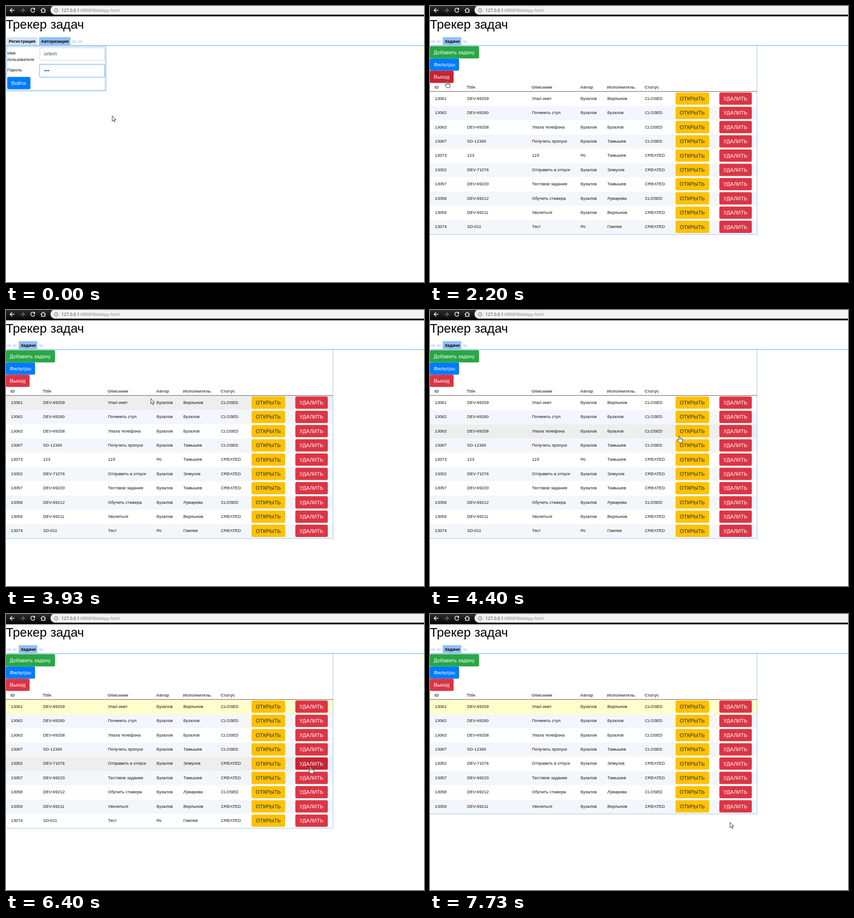
Animation, 921 px wide and 608 px high, one loop 7.79 s. Source, as an HTML page:

```html
<!DOCTYPE html>
<html lang="ru">
<head>
<meta charset="utf-8">
<title>Трекер задач</title>
<style>
html, body { margin: 0; width: 100%; height: 100%; overflow: hidden; background: #fff; }
svg { display: block; font-family: "Liberation Sans", Arial, sans-serif; }
</style>
</head>
<body>
<svg id="stage" width="921" height="608" viewBox="0 0 921 608"></svg>
<script>
const stage = document.getElementById('stage');
const LOOP = 7790, STEP = LOOP / 117;
const LOGIN_PRESS = 1700, SWITCH = 2060, ROWS_READY = 2120;
const DELETIONS = [
  { press: 5255, done: 5520, row: 4 },
  { press: 7380, done: 7600, row: 8 }
];
const ROW_TOP = 189, ROW_H = 31.4;
const LIGHT = '#d0e4f6', ACCENT = '#92c1f0';
const RED = ['#dc3545', '#c82333'], BLUE = ['#007bff', '#0069d9'];
const GREEN = ['#28a745', '#218838'], AMBER = ['#ffc107', '#e0a800'];

const TASKS = [
  ['13061', 'DEV-69259', 'Упал инет', 'Бузалов', 'Верлынов', 'CLOSED'],
  ['13062', 'DEV-69260', 'Починить стул', 'Бузалов', 'Бузалов', 'CLOSED'],
  ['13063', 'DEV-69258', 'Упала телефона', 'Бузалов', 'Бузалов', 'CLOSED'],
  ['13067', 'SD-12345', 'Получить пропуск', 'Бузалов', 'Тамышев', 'CLOSED'],
  ['13073', '123', '123', 'Ро', 'Тамышев', 'CREATED'],
  ['13052', 'DEV-71076', 'Отправить в отпуск', 'Бузалов', 'Элмусев', 'CREATED'],
  ['13057', 'DEV-69220', 'Тестовое задание', 'Бузалов', 'Тамышев', 'CREATED'],
  ['13058', 'DEV-69212', 'Обучить стажера', 'Бузалов', 'Лумарева', 'CLOSED'],
  ['13059', 'DEV-69211', 'Уволиться', 'Бузалов', 'Верлынов', 'CREATED'],
  ['13074', 'SD-011', 'Тест', 'Ро', 'Гамлев', 'CREATED']
];
const HEADERS = ['ID', 'Title', 'Описание', 'Автор', 'Исполнитель', 'Статус'];
const COLUMNS = [10, 81, 224, 331, 390, 473];

// Pointer path: time, x, y
const PATH = [
  [400, 234, 242], [1200, 96, 144], [1265, 96, 144], [1600, 37, 164],
  [1800, 35, 164], [2000, 37, 165], [3130, 37, 165], [3865, 288, 184],
  [4394, 549, 277], [4665, 642, 309], [4995, 671, 336], [6395, 671, 336],
  [7125, 664, 437], [7190, 663, 446], [7600, 661, 459]
];

const clamp = v => Math.max(0, Math.min(1, v));
const inside = (p, x, y, w, h) => p.x >= x && p.x < x + w && p.y >= y && p.y < y + h;

function pointerAt(t) {
  const i = PATH.findIndex(p => p[0] > t);
  if (i === 0) return { x: PATH[0][1], y: PATH[0][2] };
  const a = PATH[i < 0 ? PATH.length - 1 : i - 1], b = i < 0 ? a : PATH[i];
  const u = a === b ? 0 : (t - a[0]) / (b[0] - a[0]);
  return { x: a[1] + (b[1] - a[1]) * u, y: a[2] + (b[2] - a[2]) * u };
}

const rect = (x, y, w, h, fill, extra = '') =>
  `<rect x="${x}" y="${y}" width="${w}" height="${h}" fill="${fill}" ${extra}/>`;
const text = (x, y, s, size = 9.3, fill = '#111', extra = '') =>
  `<text x="${x}" y="${y}" font-size="${size}" fill="${fill}" ${extra}>${s}</text>`;
const line = (d, color, width = 1, extra = '') =>
  `<path d="${d}" fill="none" stroke="${color}" stroke-width="${width}" ${extra}/>`;
const bold = 'font-weight="bold"';
const glow = (x, y, w, h, rgb, alpha) =>
  rect(x - 2.2, y - 2.2, w + 4.4, h + 4.4, `rgba(${rgb},${alpha})`, 'rx="4.5"');

function browserBar() {
  const white = '#fff';
  return `<defs><linearGradient id="bar" x2="0" y2="1"><stop stop-color="#2b2b2b"/>
    <stop offset="1" stop-color="#050505"/></linearGradient></defs>`
    + rect(0, 0, 921, 22.5, 'url(#bar)')
    + rect(98, -1, 840, 20, '#f1f3f4', 'rx="10"')
    + rect(0, 19, 921, 3.5, '#080808')
    + line('M18.5 9.5H9M13.5 5L9 9.5L13.5 14', white, 1.5)
    + line('M31.5 9.5H41M36.5 5L41 9.5L36.5 14', '#777', 1.4)
    + line('M62.6 6.4A4.5 4.5 0 1 0 63.4 10.5', white, 1.5)
    + `<path d="M64 4V8.5H59.5Z" fill="${white}"/>`
    + line('M76.5 9.8L82 4.5L87.5 9.8M78.5 8.5V14H85.5V8.5', white, 1.5)
    + '<circle cx="110.5" cy="9.5" r="4.3" fill="none" stroke="#555b60"/>'
    + line('M110.5 9V12M110.5 6.8V8', '#555b60', 1.1)
    + text(122, 13, '127.0.0.1<tspan fill="#80868b">:8888/WebApp.html</tspan>', 9.5, '#303336',
      'font-family="Open Sans, Noto Sans, sans-serif"')
    + text(-0.5, 50, 'Трекер задач', 28, '#000');
}

function tab(x, w, label, active) {
  return rect(x, 68.5, w, 18, active ? ACCENT : LIGHT) + text(x + 4.2, 80.7, label, 9.4, '#000', bold);
}
const emptyTab = x => rect(x, 76, 9, 5, LIGHT);
const tabLine = () => rect(0, 86.2, 921, 1.7, ACCENT);

function field(y, border) {
  return rect(74.5, y, 142, 27, '#fff', `rx="3" stroke="${border}"`);
}

function button(x, y, w, label, colors, hot, pad = 8.6, ink = '#fff') {
  return rect(x, y, w, 27, colors[+hot], 'rx="3"') + text(x + pad, y + 17.4, label, 11.5, ink);
}

function loginPage(t, late) {
  const u = clamp((t - LOGIN_PRESS) / 150);
  const border = u < 0.9 ? '#9ccbfa' : '#ced4da';
  const dots = [86, 90, 94].map(x => `<circle cx="${x}" cy="142.3" r="1.5" fill="#495057"/>`).join('');
  return tab(2, 67, 'Регистрация') + tab(73, 69, 'Авторизация', true)
    + emptyTab(146) + emptyTab(159) + tabLine()
    + rect(1.5, 89.5, 217.5, 96, '#fff', `stroke="${LIGHT}" stroke-width="3"`)
    + line('M220.5 88V187.2H0', ACCENT)
    + text(3, 107, 'Имя') + text(3, 120.7, 'пользователя') + text(3, 144, 'Пароль')
    + field(92.5, '#ced4da') + text(83.5, 109, 'orlem', 11.5, '#495057')
    + glow(74.5, 129.2, 142, 27, '0,123,255', 0.25 * (1 - u))
    + field(129.2, border) + dots
    + glow(2.8, 156.3, 51, 27, '0,123,255', 0.5 * u)
    + button(2.8, 156.3, 51, 'Войти', BLUE, inside(late, 3, 156, 51, 28), 9);
}

function tasksPage(t, pointer, late) {
  let rows = t < ROWS_READY ? [] : TASKS.slice();
  let selected = -1, pressed = -1;
  for (const d of DELETIONS) {
    if (t >= d.done) { rows.splice(d.row, 1); selected = 0; pressed = -1; }
    else if (t >= d.press) selected = pressed = d.row;
  }
  const bottom = ROW_TOP + rows.length * ROW_H + 0.3;
  let out = emptyTab(2) + emptyTab(15) + tab(28, 41, 'Задачи', true) + emptyTab(73) + tabLine();
  const menu = [[108, 'Добавить задачу', GREEN], [64, 'Фильтры', BLUE], [52, 'Выход', RED]];
  menu.forEach(([w, label, colors], i) => {
    const y = 88.4 + i * 27.1;
    out += button(0, y, w, label, colors, inside(late, 0, y, w, 27), 8.3);
  });
  HEADERS.forEach((h, i) => { out += text(COLUMNS[i], 182, h, 9.3, '#4b4a5a', bold); });

  rows.forEach((row, i) => {
    const y = ROW_TOP + i * ROW_H, top = y + 1.5;
    const over = inside(pointer, 0, y, 720, ROW_H);
    const fill = i === selected ? '#ffffcc' : over ? '#eeeeee' : i % 2 ? '#f3f7fb' : '#fff';
    out += rect(0, y, 720, ROW_H, fill);
    if (i === selected) out += line(`M627 ${y + 30.6}H720`, '#c9c9b4', 1, 'stroke-dasharray="1 .5"');
    row.forEach((s, c) => { out += text(COLUMNS[c] + 0.8, y + 17.8, s); });
    out += button(541, top, 74, 'ОТКРЫТЬ', AMBER, inside(late, 541, top, 74, 27), 9.2, '#212529');
    if (i === pressed) out += glow(637.5, top, 71.5, 27, '220,53,69', 0.5);
    out += button(637.5, top, 71.5, 'УДАЛИТЬ', RED, inside(late, 637.5, top, 71.5, 27), 9);
  });
  return out + line('M0 188.4H720', '#6b6f76', 1.4)
    + line(`M720.5 88V${bottom}H0`, ACCENT);
}

function pointerKind(p, t) {
  if (t < SWITCH) {
    if (inside(p, 74, 129, 143, 28) || inside(p, 74, 92, 143, 28)) return 'beam';
    return inside(p, 3, 156, 51, 28) ? 'hand' : 'arrow';
  }
  if (inside(p, 0, 88, 108, 27) || inside(p, 0, 115, 64, 27) || inside(p, 0, 142, 52, 28)) return 'hand';
  const count = TASKS.length - DELETIONS.filter(d => t >= d.done).length;
  const row = Math.floor((p.y - ROW_TOP) / ROW_H);
  const top = ROW_TOP + row * ROW_H + 1.5;
  const onButton = inside(p, 541, top, 74, 27) || inside(p, 637.5, top, 71.5, 27);
  return row >= 0 && row < count && onButton ? 'hand' : 'arrow';
}

function drawPointer(p, kind) {
  const place = `transform="translate(${p.x} ${p.y})"`;
  if (kind === 'beam') return line('M-3 -7.5H-.6L0 -7L.6 -7.5H3M0 -7V7M-3 7.5H-.6L0 7L.6 7.5H3', '#222', 1, place);
  const shape = kind === 'arrow'
    ? 'M0 0V11.8L2.7 9.3L4.6 13.5L6.5 12.7L4.6 8.6H8.4Z'
    : 'M-1.2 9.5V1.2Q0 -.6 1.2 1.2V5.5Q2.6 4.6 3.4 6Q4.8 5.2 5.6 6.6Q7.4 6 7.6 8V10.5Q7.4 12.5 6 15H-.5Q-1.5 13 -3.8 10.3Q-4.6 8.6 -3 8.2Q-2 8.4 -1.2 9.5Z';
  const creases = kind === 'hand' ? line('M1.2 5.5V8.5M3.4 6V8.5M5.6 6.6V8.7', '#222', 0.7, place) : '';
  return `<path d="${shape}" fill="#fff" stroke="#111" stroke-width=".9" stroke-linejoin="round" ${place}/>` + creases;
}

function scene(t) {
  const pointer = pointerAt(t);
  const late = pointerAt(t - 100); // button shades trail the pointer
  return rect(0, 0, 921, 608, '#fff') + browserBar()
    + (t < SWITCH ? loginPage(t, late) : tasksPage(t, pointer, late))
    + drawPointer(pointer, pointerKind(pointer, t));
}

const start = performance.now();
let shown = -1;
function tick() {
  const t = (performance.now() - start) % LOOP;
  const step = Math.min(116, Math.floor((t + 5) / STEP));
  if (step !== shown) {
    shown = step;
    stage.innerHTML = scene(step * STEP);
  }
  requestAnimationFrame(tick);
}
tick();
</script>
</body>
</html>
```
